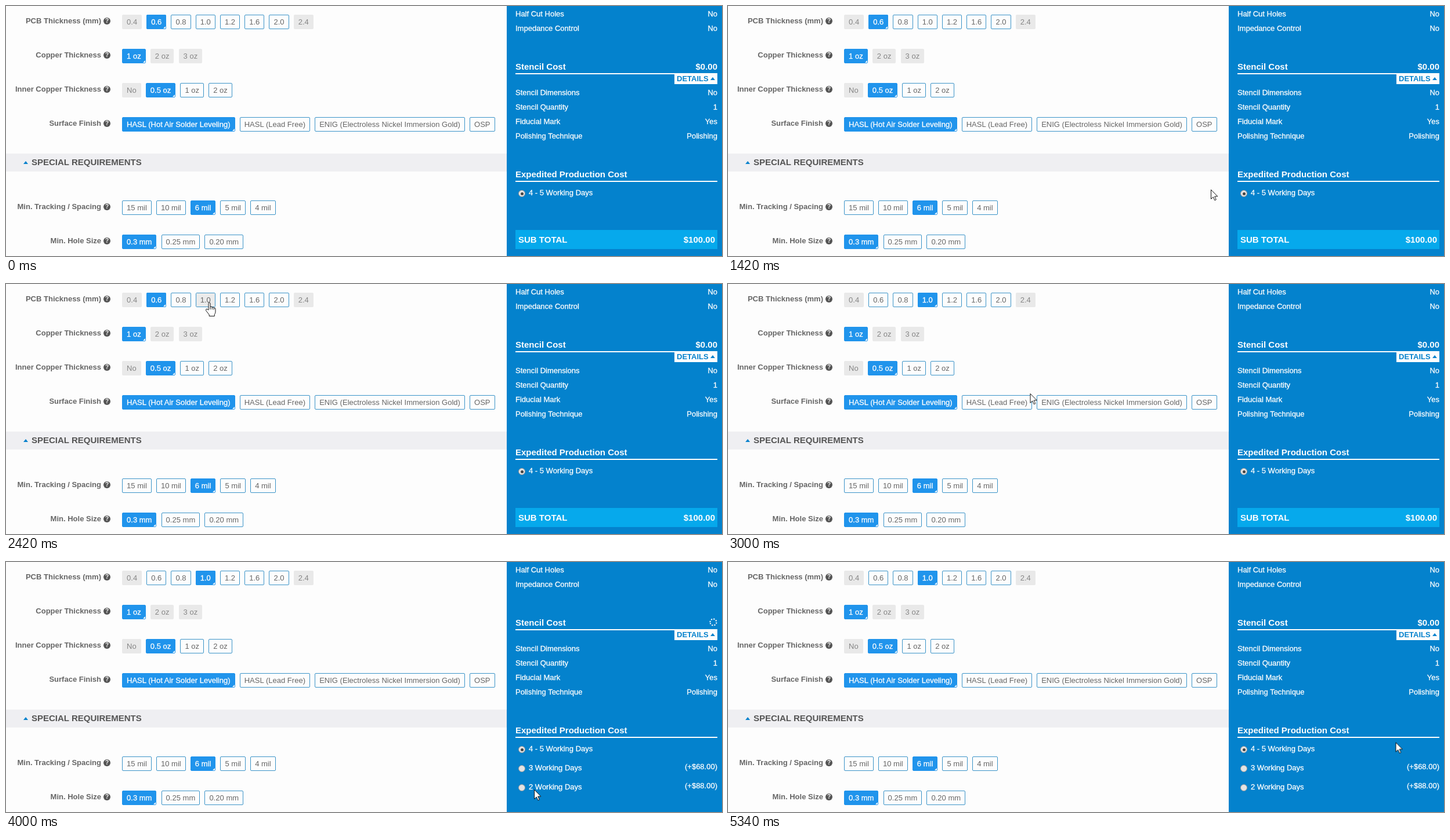
Recreate the animation shown at these times as an HTML page. Size 1234 by 432 pixels, loop 5430 ms.

```html
<!DOCTYPE html>
<html lang="en">
<head>
<meta charset="utf-8">
<title>PCB quote form</title>
<style>
:root { --loop: 5430ms; --panel: #0482cd; --blue: #2094ec; --white: #fdfdfd; --pale: #e9e9e9; }
html, body { margin: 0; width: 100%; height: 100%; overflow: hidden; }
body { font: 13px/20px "Liberation Sans", Arial, sans-serif; }
#stage { position: relative; width: 1234px; height: 432px; overflow: hidden; background: var(--white); color: #666; }
#stage > *, #side > * { position: absolute; white-space: nowrap; }

/* form */
.field { left: 0; height: 25px; }
.field b { position: absolute; right: -164px; top: 1px; }
.field i { position: absolute; left: 168px; top: 5px; width: 12px; height: 12px; border-radius: 50%;
  background: #555; color: var(--white); font: bold 10px/12px "Liberation Sans", Arial, sans-serif; text-align: center; }
.opts { position: absolute; left: 200px; top: 0; display: flex; gap: 8.1px; letter-spacing: .02px; }
.opts > span { position: relative; box-sizing: border-box; height: 25px; padding: 0 7px; line-height: 23px;
  border: 1px solid #3a93c8; border-radius: 2px; }
.opts .off { background: var(--pale); border-color: var(--pale); color: #858585; }
.opts .on, .pick { background: var(--blue); border-color: var(--blue); color: var(--white); }
.on, .pick, .row { -webkit-text-stroke: .3px; }
.pick { position: absolute; inset: -1px; padding: 1px 8px; border-radius: 2px; }
.on::after, .pick::after { content: ""; position: absolute; right: 1px; bottom: 1px;
  border: 2.5px solid; border-color: transparent var(--white) var(--white) transparent; }
.on::after { right: 0; bottom: 0; }
.hover { position: absolute; inset: 0; padding: 0 7px; background: #ebebeb; }
#band { left: 0; top: 255px; width: 863px; height: 31px; background: #efeff2; }
#band b { position: absolute; left: 44px; top: 5px; font-size: 15px; color: #555; }
.up { position: absolute; border: solid transparent; border-width: 0 4.5px 5px; border-bottom-color: var(--panel); }

/* cost panel */
#side { left: 863px; top: 0; width: 371px; height: 432px; background: var(--panel); color: var(--white); }
.row { left: 15px; width: 348px; height: 20px; display: flex; justify-content: space-between; }
.row.head { font-weight: bold; font-size: 15px; -webkit-text-stroke: 0; }
.rule { left: 15px; width: 348px; height: 2px; background: var(--white); }
#details { left: 289px; top: 117px; width: 74px; height: 18px; background: var(--white); color: var(--panel);
  font-weight: bold; line-height: 18px; text-indent: 4px; }
#total { left: 15px; top: 387px; width: 348px; height: 33px; box-sizing: border-box; padding: 0 4px 0 5px;
  background: #06a9ec; line-height: 33px; }
.row.day { left: 38px; width: 325px; }
.day s { position: absolute; left: -18px; top: 5px; width: 10px; height: 10px; border: 1px solid #999;
  border-radius: 50%; background: #e4e4e4; }
.day.set s::after { content: ""; position: absolute; inset: 2.5px; border-radius: 50%; background: #444; }
.day u { text-decoration: none; position: relative; top: -2px; }
#spin { left: 349px; top: 97px; width: 14px; height: 14px; }
#spin circle { fill: none; stroke: var(--white); stroke-width: 2; stroke-dasharray: 2.2 2.12; }

/* changes of state */
.old, .new, .hover, .late, #total, #price, #spin, .arrow, .hand { animation: var(--loop) step-end infinite; }
.old { animation-name: drop; }
.new { animation-name: take; }
.hover { animation-name: hover; }
.late { animation-name: late; }
#total { animation-name: leave; }
#price { animation-name: hide; }
#spin { animation-name: show; }
#spin circle { transform-origin: 7px 7px; animation: turn 720ms steps(12) infinite; }
.arrow { animation-name: arrow; }
.hand { animation-name: hand; }
@keyframes drop { 0% { opacity: 1 } 47.69%, 100% { opacity: 0 } }
@keyframes take { 0% { opacity: 0 } 47.69%, 100% { opacity: 1 } }
@keyframes hover { 0% { opacity: 0 } 40.5% { opacity: 1 } 47.69%, 100% { opacity: 0 } }
@keyframes late { 0% { opacity: 0 } 60.7%, 100% { opacity: 1 } }
@keyframes leave { 0% { top: 387px } 60.7%, 100% { top: 453px } }
@keyframes hide { 0% { opacity: 1 } 73.6% { opacity: 0 } 84.5%, 100% { opacity: 1 } }
@keyframes show { 0% { opacity: 0 } 73.6% { opacity: 1 } 84.5%, 100% { opacity: 0 } }
@keyframes turn { to { transform: rotate(360deg) } }
@keyframes arrow { 0% { opacity: 1 } 40.5% { opacity: 0 } 50.5%, 100% { opacity: 1 } }
@keyframes hand { 0% { opacity: 0 } 40.5% { opacity: 1 } 50.5%, 100% { opacity: 0 } }

/* pointer: in from below, pick a thickness, over to the panel, rest, then on */
#pointer { left: 0; top: 0; width: 26px; height: 30px; overflow: visible; stroke: #111; fill: #fff;
  animation: path var(--loop) linear infinite; }
@keyframes path {
  0%, 14% { transform: translate(1130px, 440px); animation-timing-function: ease-out }
  23%, 25.9% { transform: translate(881px, 336px) }
  26.15%, 26.8% { transform: translate(832px, 317px); animation-timing-function: cubic-bezier(.3, .3, .5, 1) }
  43%, 48.8% { transform: translate(349px, 32px); animation-timing-function: cubic-bezier(.4, 0, .8, .8) }
  55.24%, 56.5% { transform: translate(520.5px, 189px); animation-timing-function: cubic-bezier(.3, .3, .6, .9) }
  65.19%, 66% { transform: translate(867.5px, 347px); animation-timing-function: ease-out }
  81%, 87.4% { transform: translate(928.5px, 413px); animation-timing-function: ease-in-out }
  98.34%, 100% { transform: translate(1150.5px, 311.5px) }
}
</style>
</head>
<body>
<div id="stage">
  <div class="field" style="top:15px"><b>PCB Thickness (mm)</b><i>?</i><div class="opts">
    <span class="off">0.4</span><span>0.6<span class="pick old">0.6</span></span><span>0.8</span>
    <span>1.0<span class="hover">1.0</span><span class="pick new">1.0</span></span>
    <span>1.2</span><span>1.6</span><span>2.0</span><span class="off">2.4</span></div></div>
  <div class="field" style="top:74px"><b>Copper Thickness</b><i>?</i><div class="opts">
    <span class="on">1 oz</span><span class="off">2 oz</span><span class="off">3 oz</span></div></div>
  <div class="field" style="top:133px"><b>Inner Copper Thickness</b><i>?</i><div class="opts">
    <span class="off">No</span><span class="on">0.5 oz</span><span>1 oz</span><span>2 oz</span></div></div>
  <div class="field" style="top:192px"><b>Surface Finish</b><i>?</i><div class="opts">
    <span class="on">HASL (Hot Air Solder Leveling)</span><span>HASL (Lead Free)</span>
    <span>ENIG (Electroless Nickel Immersion Gold)</span><span>OSP</span></div></div>
  <div id="band"><span class="up" style="left:30px;top:13px"></span><b>SPECIAL REQUIREMENTS</b></div>
  <div class="field" style="top:336px"><b>Min. Tracking / Spacing</b><i>?</i><div class="opts">
    <span>15 mil</span><span>10 mil</span><span class="on">6 mil</span><span>5 mil</span><span>4 mil</span></div></div>
  <div class="field" style="top:395px"><b>Min. Hole Size</b><i>?</i><div class="opts">
    <span class="on">0.3 mm</span><span>0.25 mm</span><span>0.20 mm</span></div></div>

  <div id="side">
    <div class="row" style="top:4px"><span>Half Cut Holes</span><span>No</span></div>
    <div class="row" style="top:29px"><span>Impedance Control</span><span>No</span></div>
    <div class="row head" style="top:95px"><span>Stencil Cost</span><span id="price">$0.00</span></div>
    <svg id="spin"><circle cx="7" cy="7" r="5.5"/></svg>
    <div class="rule" style="top:116px"></div>
    <div id="details">DETAILS<span class="up" style="left:62px;top:6px"></span></div>
    <div class="row" style="top:140px"><span>Stencil Dimensions</span><span>No</span></div>
    <div class="row" style="top:165px"><span>Stencil Quantity</span><span>1</span></div>
    <div class="row" style="top:190px"><span>Fiducial Mark</span><span>Yes</span></div>
    <div class="row" style="top:215px"><span>Polishing Technique</span><span>Polishing</span></div>
    <div class="row head" style="top:281px">Expedited Production Cost</div>
    <div class="rule" style="top:302px"></div>
    <div class="row day set" style="top:313px"><s></s>4 - 5 Working Days</div>
    <div class="row day late" style="top:346px"><s></s><span>3 Working Days</span><u>(+$68.00)</u></div>
    <div class="row day late" style="top:379px"><s></s><span>2 Working Days</span><u>(+$88.00)</u></div>
    <div id="total" class="row head"><span>SUB TOTAL</span><span>$100.00</span></div>
  </div>

  <svg id="pointer">
    <path class="arrow" d="M.5.5V16.5L4.2 13 6.9 18.8 9.3 17.7 6.7 12H11.8Z"/>
    <path class="hand" stroke-linejoin="round" d="M0 13V2Q0 0 1.5 0T3 2V7.5Q5.8 6 6.2 8.3 8.5 7 9.2 9.2 12 8.5 12 11V16Q12 19 10.3 20.5V23.5H1.2V21L-4 14.5Q-5.5 11.5-3 11Z M3 7.5V12M6.2 8.3V12M9.2 9.2V12.5"/>
  </svg>
</div>
</body>
</html>
```
